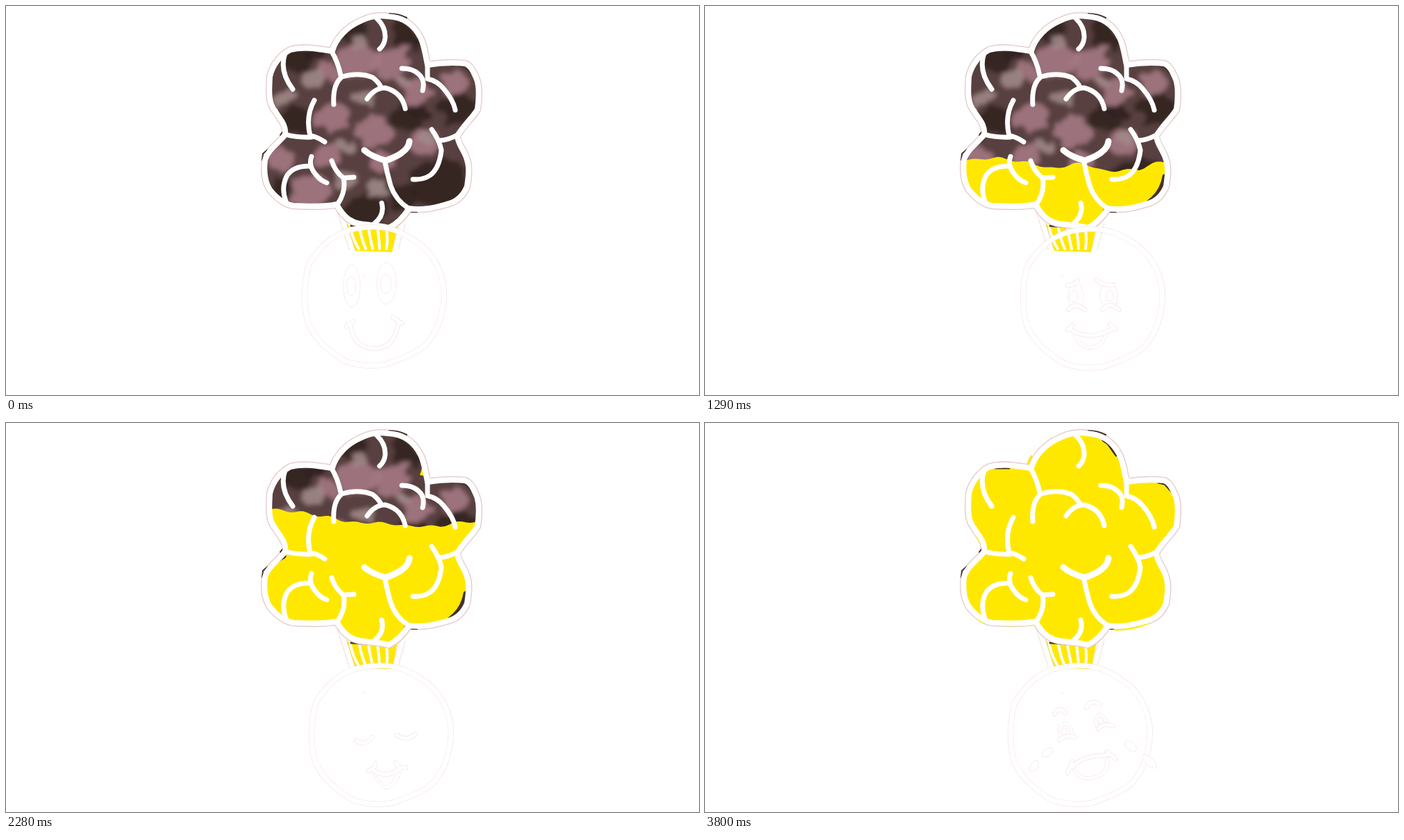
Write an HTML page that moves like this. It is 998 by 561 pixels and loops after 3970 ms.

```html
<!DOCTYPE html>
<html lang="en">
<head>
<meta charset="utf-8">
<title>Filling up</title>
<style>
  html, body { margin: 0; width: 100%; height: 100%; overflow: hidden; background: #fff; }
  svg { display: block; width: 100vw; height: 100vh; }
  path, ellipse, use { fill: none; stroke-linecap: round; stroke-linejoin: round; }
  .white { stroke: #fff; stroke-width: 7; }
  .edge { stroke: #e6caca; stroke-width: 10.6; stroke-dasharray: 2 1.2; stroke-linecap: butt; }
  .yellow { fill: #ffe800; }
  .dark { stroke: #43302f; stroke-width: 3; }
  .thin, .tube { stroke: #f1d3d3; stroke-width: .8; stroke-dasharray: 1.6 1.2; stroke-linecap: butt; }
  .tube { stroke-width: 8.4; stroke-linecap: round; stroke-dasharray: none; stroke: #f6e2e2; }
  .small { stroke-width: 6.4; }
  .tube.core { stroke: #fff; stroke-width: 7; }
  .small.core { stroke-width: 5; }
  #head .tube:not(.small):not(.core) { stroke: #f1d3d3; stroke-dasharray: 1.6 1.2; stroke-linecap: butt; }
</style>
</head>
<body>
<svg viewBox="0 0 998 561" preserveAspectRatio="none">
  <defs>
    <path id="outline" d="M470 65C475 46 492 29 512 21C524 15 537 13 550 15C572 16 588 28 597 46C602 56 604 70 607 85
      C626 82 641 81 661 83C670 86 674 97 678 106C682 118 681 134 679 149C671 162 660 171 650 187
      C650 198 659 207 663 219C668 232 666 246 664 260C658 275 648 283 634 286C617 291 600 295 580 292
      C573 304 565 313 551 320C540 316 529 317 519 315C498 314 487 306 476 286
      C460 290 433 289 414 288C400 286 388 275 380 265C373 254 371 240 373 222C377 208 390 200 402 186
      C404 170 393 162 388 152C377 140 379 121 380 102C384 84 396 70 410 63C430 58 447 62 470 65Z"/>
    <clipPath id="inside"><use href="#outline"/></clipPath>
    <pattern id="dots" width="3" height="3" patternUnits="userSpaceOnUse" patternTransform="rotate(35)">
      <rect width="3" height="3" fill="#7d5a5c"/><circle cx="1.5" cy="1.5" r="1.25" fill="#fff"/>
    </pattern>
    <filter id="soft" x="-5%" y="-5%" width="110%" height="110%">
      <feTurbulence type="fractalNoise" baseFrequency=".045" numOctaves="3" seed="4"/>
      <feDisplacementMap in="SourceGraphic" scale="26" xChannelSelector="R" yChannelSelector="G"/>
      <feGaussianBlur stdDeviation="3"/>
    </filter>
  </defs>

  <path class="yellow" d="M486 308L495 318L530 319L564 316L556 355L503 353Z"/>
  <path id="ribs" class="white" style="stroke-width:4"/>
  <path class="edge" style="stroke-width:9" d="M481 296L498 350M571 313L561 350"/>
  <path class="white" d="M481 296L498 350M571 313L561 350"/>
  <path class="dark" d="M478 293L490 308M580 297L586 296M497 317L535 320"/>

  <use href="#outline" class="edge"/>
  <path class="dark" style="stroke-width:2" d="M369 222L370 213L377 207M395 186L398 182M660 273L665 264M552 11Q566 11 577 17M584 297L592 297"/>
  <g clip-path="url(#inside)">
    <g id="photo" filter="url(#soft)"><rect x="340" y="-10" width="370" height="350" fill="#593f3f"/></g>
    <path d="M656 202Q642 212 643 228Q646 250 664 257L670 215Z" fill="url(#dots)"/>
    <path id="fill" class="yellow"/>
    <path id="gaps" class="dark" style="stroke-width:7" d="M662 246Q658 270 638 284M577 294Q574 306 564 314M376 214Q384 200 400 192"/>
    <path class="dark" d="M573 25L580 30L592 47M418 65L438 65M653 86L662 88L671 98M482 297L491 307"/>
  </g>
  <path id="fleck" class="yellow" d="M596 75L600 62L606 77Z"/>
  <path id="spill" style="stroke:#ffe800;stroke-width:3" d="M386 274L397 286Q430 295 474 290M590 298Q615 299 640 288M389 158L396 172M465 58L470 48"/>

  <use href="#outline" class="white" style="stroke-width:8"/>
  <path class="white" d="M534 18Q547 30 546 46Q545 56 538 62M402 68Q393 94 413 120M468 64Q478 80 482 100
    M472 142Q470 113 484 102Q508 95 528 103Q537 110 540 117M520 134Q531 118 546 118Q570 124 575 148
    M570 90Q586 90 594 98Q604 106 600 122M607 80L607 105Q621 108 630 119Q644 135 647 150
    M444 136Q431 159 438 187Q447 188 459 196M402 185Q418 190 440 189
    M440 217Q435 230 446 243Q453 252 462 255M404 284Q395 262 405 244Q415 230 437 231
    M469 223Q474 239 486 248L501 247M486 248Q490 267 478 285M546 226Q549 242 554 259Q561 280 580 292
    M613 178Q624 193 627 208Q624 234 611 244Q601 251 586 250M625 194Q638 193 650 186M541 284Q546 302 530 314"/>
  <path class="white" style="stroke-width:9" d="M516 208Q526 217 547 223Q566 216 572 210Q580 204 581 195"/>

  <path class="thin" d="M513 388L517 390"/>
  <g id="head">
    <path class="tube" d="M-30 -97C0 -103 22 -100 38 -92C62 -81 78 -68 88 -50C98 -32 101 -16 101 0C98 30 92 48 76 68
      C62 82 38 90 16 98C-4 101 -24 100 -42 93C-62 80 -82 66 -94 40C-102 18 -102 -16 -94 -46C-78 -74 -55 -92 -30 -97Z"/>

    <g class="look" transform="translate(-530 -419)">
      <ellipse class="thin" cx="498" cy="404" rx="12" ry="30"/><ellipse class="thin" cx="497" cy="404" rx="6.5" ry="14"/>
      <ellipse class="thin" cx="548" cy="400" rx="14" ry="30"/><ellipse class="thin" cx="547" cy="401" rx="8" ry="14"/>
      <path class="tube small" d="M490 462L500 455M496 460Q501 495 533 494Q560 492 565 457M557 449L571 458"/>
    </g>

    <g class="look" transform="translate(-540 -452)">
      <ellipse class="thin" cx="509" cy="438" rx="11" ry="27"/><ellipse class="thin" cx="510" cy="435" rx="6" ry="9"/>
      <ellipse class="thin" cx="559" cy="438" rx="13" ry="28"/><ellipse class="thin" cx="560" cy="433" rx="5.5" ry="7"/>
      <path class="tube small" d="M497 493L507 487M502 491Q510 508 540 508Q567 507 572 490M567 486L578 493"/>
    </g>

    <g class="look" transform="translate(-558 -422)">
      <path class="tube small" d="M522 403Q535 402 537 395M564 395Q572 404 588 402M523 438Q534 426 547 438M572 438Q584 425 596 438
        M522 467L529 460M525 466Q555 485 588 465M583 459L591 466"/>
      <path class="thin" d="M526 405Q519 418 526 433M540 402Q549 419 542 433M573 404Q564 418 574 433M590 404Q597 418 591 433
        M530 475Q538 495 556 495Q576 493 580 471M537 479Q546 491 556 490Q570 488 574 476"/>
      <ellipse class="thin" cx="531" cy="419" rx="6" ry="8"/><ellipse class="thin" cx="583" cy="418" rx="5" ry="8"/>
    </g>

    <g class="look" transform="translate(-546 -420)">
      <path class="tube small" d="M510 428Q522 437 534 423M568 420Q584 430 596 418M528 472L537 466L538 461M534 470Q554 485 575 467M567 460L572 466L582 467"/>
      <path class="thin" d="M534 475Q545 497 553 498Q568 495 575 473M540 479Q549 493 553 493Q563 490 567 478"/>
    </g>

    <g class="look" transform="translate(-540 -450)">
      <path class="tube small" d="M503 420Q509 408 519 418M549 411Q555 398 569 405M510 457Q520 449 533 453M566 441Q575 431 587 437
        M522 505L529 488M529 497Q540 480 579 479M579 474L591 484"/>
      <path class="thin" d="M510 454Q505 432 519 431Q530 435 531 450M513 450Q511 437 519 436Q525 439 526 449
        M563 440Q556 421 568 418Q578 421 580 433M567 437Q562 424 569 422Q574 425 575 432
        M529 500Q537 514 551 515Q572 512 577 505Q585 494 580 482M534 500Q544 511 553 510Q569 508 573 501Q578 492 576 484"/>
      <ellipse class="thin" cx="518" cy="445" rx="3" ry="5"/><ellipse class="thin" cx="570" cy="430" rx="3" ry="5"/>
      <g id="tears">
        <ellipse class="thin" rx="10" ry="6" transform="translate(613 466) rotate(45)"/>
        <ellipse class="thin" rx="13" ry="5.5" style="fill:#fff" transform="translate(640 488) rotate(42)"/>
        <ellipse class="thin" rx="9" ry="5" transform="translate(493 475) rotate(-35)"/>
        <ellipse class="thin" rx="9" ry="5" transform="translate(474 495) rotate(-58)"/>
      </g>
    </g>
  </g>
</svg>
<script>
const LOOP = 3970;
const $ = id => document.getElementById(id);
const looks = [...document.querySelectorAll('.look')];

// Soft blobs in the main tones: x y radius, separated by commas
const tones = {
  '#2f2120': '625 255 42,650 150 26,515 298 30,575 160 22,420 165 24,585 40 28,500 36 22,420 78 22,395 265 18,570 275 24,595 150 16,448 68 16',
  '#a57983': '505 78 30,555 82 27,590 122 22,470 160 26,530 180 27,440 268 30,398 222 22,460 215 20,600 198 22,648 112 20,462 95 16,545 225 18',
  '#a08a89': '442 105 16,492 250 16,535 265 18,510 50 12,605 190 9,400 132 16,515 132 13,490 205 12,572 108 9'
};
function add(parent, name, attrs) {
  const el = document.createElementNS('http://www.w3.org/2000/svg', name);
  for (const key in attrs) el.setAttribute(key, attrs[key]);
  parent.append(el);
}
for (const [fill, list] of Object.entries(tones))
  for (const blob of list.split(',')) {
    const [cx, cy, r] = blob.split(' ');
    add($('photo'), 'ellipse', { cx, cy, rx: r, ry: r * .85, style: `fill:${fill}`, opacity: .88 });
  }

// A white core over each coloured tube leaves only its contour
for (const tube of document.querySelectorAll('.tube')) {
  const core = tube.cloneNode();
  core.classList.add('core');
  tube.after(core);
}
$('ribs').setAttribute('d', [0, 1, 2, 3, 4].map(i =>
  `M${496 + 13 * i} 320Q${500 + 12.5 * i} 338 ${508 + 10 * i} 350`).join(''));

// Head centre and look, one every 330 ms after the first
const poses = [
  [530, 419, 0], [540, 452, 1], [538, 421, 1], [558, 422, 2],
  [540, 450, 2], [546, 420, 3], [540, 450, 3], [540, 450, 4]
];

// Height of the yellow surface every 40 px from x = 380, at given steps
const levels = [
  [0, [293, 293, 293, 291, 293, 290, 293, 293]],
  [1, [277, 277, 277, 274, 277, 273, 277, 277]],
  [4, [222, 219, 225, 234, 227, 238, 236, 224]],
  [8, [165, 154, 161, 167, 169, 176, 175, 186]],
  [12, [84, 102, 109, 120, 119, 121, 123, 99]],
  [16, [66, 62, 70, 72, 69, 73, 84, 84]],
  [18, [30, 30, 36, 38, 34, 36, 40, 40]],
  [19, [0, 0, 0, 0, 0, 0, 0, 0]]
];
const stepTime = k => k <= 12 ? 630 + 10 * Math.ceil(16.5 * k) : 2610 + 170 * (k - 12);
const mix = (a, b, f) => a + (b - a) * f;

function surface(step) {
  const n = Math.max(1, levels.findIndex(l => l[0] >= step));
  const [s0, a] = levels[n - 1], [s1, b] = levels[n];
  const f = (step - s0) / (s1 - s0);
  const heights = a.map((v, i) => mix(v, b[i], f));
  const [left, right] = step < 2 ? [470, 588] : [362, 692];
  let d = `M${left} 335`;
  for (let x = left; x <= right; x += 6) {
    const u = Math.min(6.999, Math.max(0, (x - 380) / 40)), i = Math.floor(u);
    const ease = (1 - Math.cos((u - i) * Math.PI)) / 2;
    const y = mix(heights[i], heights[i + 1], ease) + 1.5 * Math.sin(x * .17 + step * 2);
    d += `L${x} ${y.toFixed(1)}`;
  }
  return d + `L${right} 335Z`;
}

const show = (el, on) => { el.style.display = on ? '' : 'none'; };
let lastStep, lastPose;

function draw(now) {
  const t = now % LOOP;
  let step = -1;
  while (step < 19 && t >= stepTime(step + 1)) step++;
  const pose = t < 600 ? 0 : Math.min(7, Math.floor((t - 600) / 330) + 1);
  if (step !== lastStep) {
    $('fill').setAttribute('d', step < 0 ? '' : surface(step));
    show($('gaps'), step >= 0 && step < 11);
    show($('fleck'), step >= 6 && step < 12);
    show($('spill'), step >= 12);
    lastStep = step;
  }
  if (pose !== lastPose) {
    const [x, y, look] = poses[pose];
    $('head').setAttribute('transform', `translate(${x} ${y})`);
    looks.forEach((el, i) => show(el, i === look));
    lastPose = pose;
  }
}
const start = performance.now();
function tick() {
  draw(performance.now() - start);
  requestAnimationFrame(tick);
}
tick();
</script>
</body>
</html>
```
